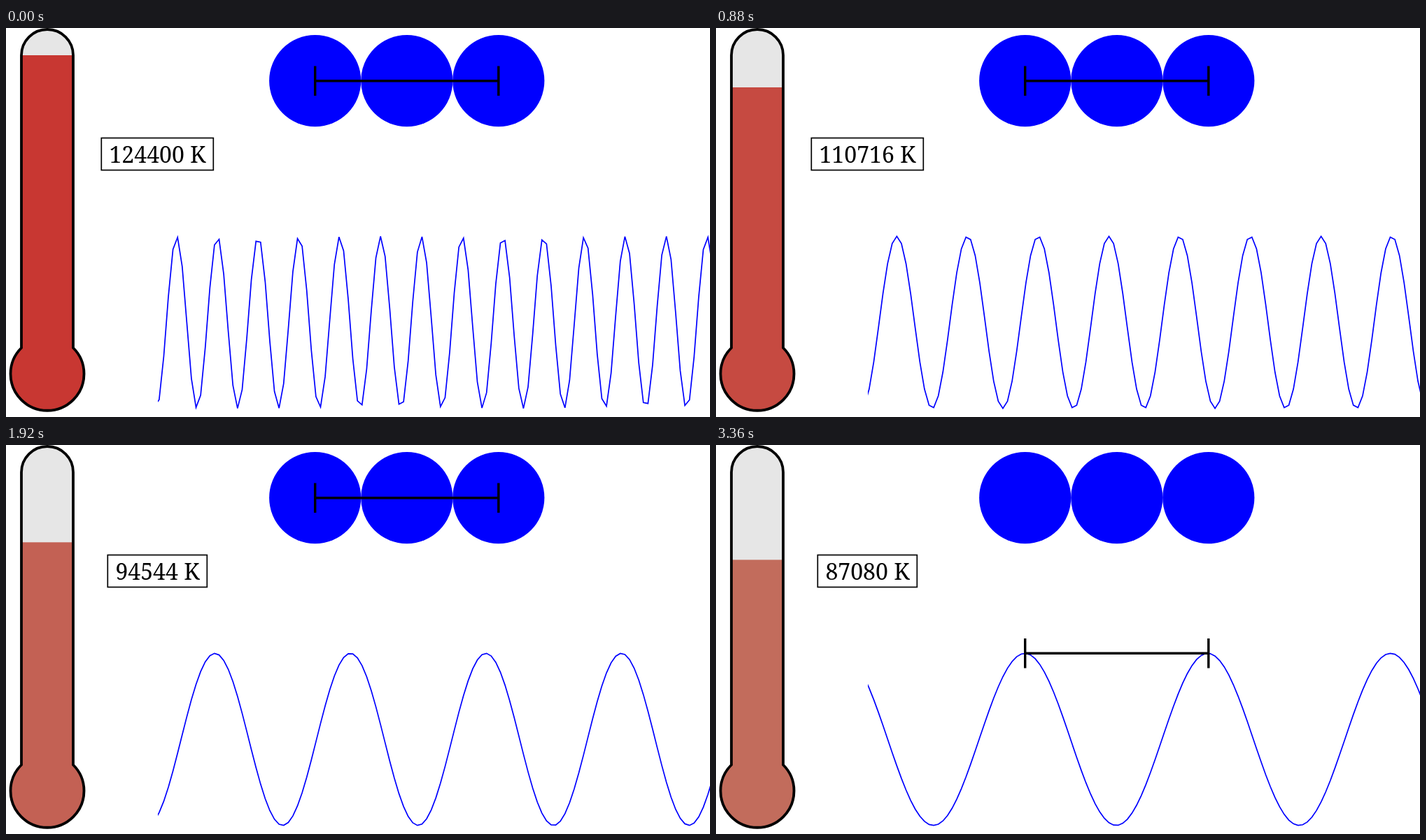
Animation, 1006 px wide and 557 px high, one loop 4400 ms. Source, as an HTML page:

```html
<!DOCTYPE html>
<html lang="en">
<head>
<meta charset="utf-8">
<title>Temperature and wavelength</title>
<style>
  html, body { margin: 0; width: 100%; height: 100%; overflow: hidden; background: #fff; }
  svg { display: block; }
  text { font: 32px "Noto Serif", serif; text-anchor: middle; }
</style>
</head>
<body>
<svg width="1006" height="557" viewBox="0 0 1006 557">
  <defs>
    <path id="glass" d="M22 458V39a37 37 0 0 1 74 0V458A52.5 52.5 0 1 1 22 458Z"/>
    <clipPath id="inside"><use href="#glass"/></clipPath>
    <clipPath id="plot"><rect x="217" y="280" width="789" height="277"/></clipPath>
  </defs>

  <use href="#glass" fill="#e6e6e6"/>
  <rect id="fluid" width="120" height="557" clip-path="url(#inside)"/>
  <use href="#glass" fill="none" stroke="#000" stroke-width="3.8"/>

  <rect id="frame" y="157.5" height="46" fill="none" stroke="#000" stroke-width="1.7"/>
  <text id="label" x="216.5" y="193"></text>

  <g fill="#00f">
    <circle cx="441.7" cy="75.6" r="65.6"/>
    <circle cx="572.8" cy="75.6" r="65.6"/>
    <circle cx="703.8" cy="75.6" r="65.6"/>
  </g>
  <polyline id="wave" clip-path="url(#plot)" fill="none" stroke="#00f" stroke-width="1.7"/>
  <path id="ruler" d="M441.7 54.6v42.4M703.8 54.6v42.4M441.7 75.7H703.8" fill="none" stroke="#000" stroke-width="3.4"/>
</svg>
<script>
const LOOP = 4400, TICK = 80, COOL_STEPS = 30, DROP_START = 2480;
const get = id => document.getElementById(id);
const [fluid, frame, label, wave, ruler] = ['fluid', 'frame', 'label', 'wave', 'ruler'].map(get);

function wavePoints(length) {
  const midX = 637.3, midY = 421.5, amp = 123.2, gap = 6.59;
  const points = [];
  for (let k = -64.5; k < 58; k++) {
    const dx = k * gap;
    const y = midY - amp * Math.sin(2 * Math.PI * dx / length);
    points.push((midX + dx).toFixed(2) + ',' + y.toFixed(2));
  }
  return points.join(' ');
}

function cool(n) {
  const kelvin = 124400 - 1244 * n;
  const width = kelvin > 99999 ? 160 : 142;
  fluid.setAttribute('y', 39 + 4.18 * n);
  fluid.setAttribute('fill', `rgb(${200 - 0.2 * n}, ${55 + 1.77 * n}, ${50 + 1.4 * n})`);
  label.textContent = kelvin + ' K';
  frame.setAttribute('x', 216.3 - width / 2);
  frame.setAttribute('width', width);
  wave.setAttribute('points', wavePoints(58.3 * Math.exp(0.05 * n)));
}

let shown = -1;
function draw(now) {
  const t = now % LOOP;
  const n = Math.min(COOL_STEPS, Math.floor(t / TICK));
  if (n !== shown) cool(shown = n);
  const drop = Math.max(0, Math.floor((t - DROP_START) / TICK));
  ruler.setAttribute('transform', `translate(0 ${Math.min(21 * drop, 222.5)})`);
}

let start;
function loop(now) {
  start ??= now;
  draw(Math.max(0, now - start));
  requestAnimationFrame(loop);
}
draw(0);
requestAnimationFrame(loop);
</script>
</body>
</html>
```
